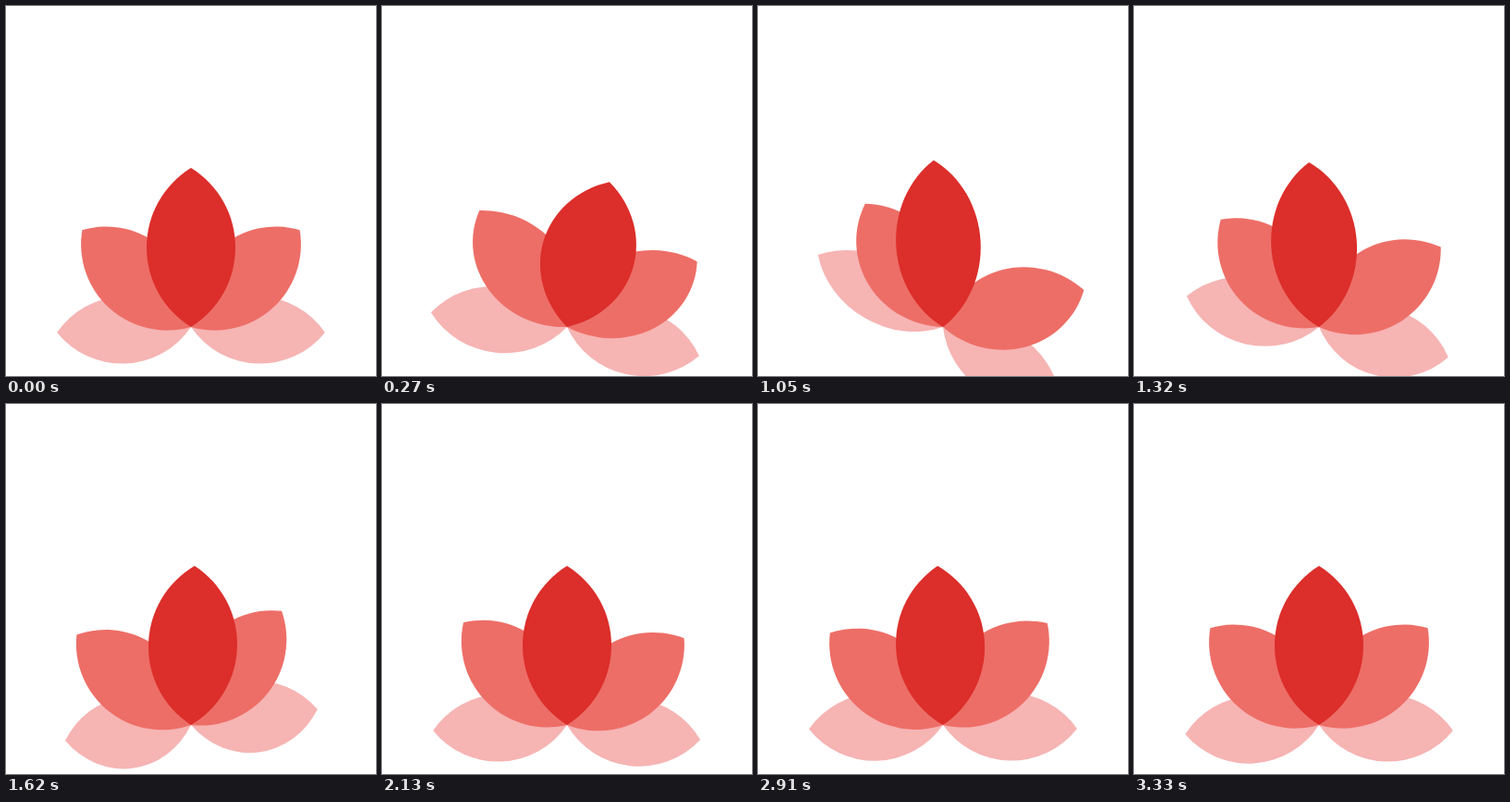
An HTML page for the animation above (3660 ms loop, 400 px wide and 400 px high).

```html
<!DOCTYPE html>
<html lang="en">
<head>
<meta charset="utf-8">
<title>Lotus</title>
<style>
html, body { margin: 0; width: 100%; height: 100%; overflow: hidden; background: #fff; }
svg { display: block; width: 100vw; height: 100vh; }
</style>
</head>
<body>
<svg id="stage" viewBox="0 0 400 400"></svg>
<script>
const LOOP = 3660, STEP = 30, LAST = 3330;
const POSES = [0, 540, 1050, 1620, 2130, 2580, LAST];

const kinds = {
  low: { length: 145, width: 73, rest: 92.4, fill: '#f6b4b3' },
  mid: { length: 157.5, width: 87, rest: 48.3, fill: '#ed6e67' },
  top: { length: 172, width: 96, rest: 0, fill: '#dc2e2a' }
};

// Painted back to front. The lists hold the poses after the rest pose:
// swing and bend in degrees, stretch as a factor along the petal.
const petals = [
  { kind: 'low', side: -1, swing: [21.2, 32.4, -4.7, 0, 2.4, -1.6], stretch: [1.05, 1.076, .945] },
  { kind: 'low', side: 1, swing: [23.7, 29.5, -9.5, 3.9, -.8], stretch: [1.02, 1.03, .95] },
  { kind: 'mid', side: -1, swing: [24.8, 16, -3.4, 3, -3.9], bend: [9, 2] },
  { kind: 'mid', side: 1, swing: [33.4, 27, -9.8, 5.2, -3.6], bend: [-9, -2] },
  { kind: 'top', side: 1, swing: [32.2, -3.2, 1.3, 0, -3.3], stretch: [.907, 1.05] }
];

const stage = document.getElementById('stage');

for (const p of petals) {
  const { length, width, rest, fill } = kinds[p.kind];
  const r = (length * length + width * width) / (4 * width);
  const arc = `A${r} ${r} 0 0 1 0 `;
  p.rest = p.side * rest;
  p.node = document.createElementNS('http://www.w3.org/2000/svg', 'path');
  p.node.setAttribute('d', `M0 0${arc}${-length}${arc}0Z`);
  p.node.setAttribute('fill', fill);
  stage.append(p.node);
}

// Smooth spline through the poses; missing poses are at rest.
function track(list, rest, t) {
  const end = POSES.length - 1;
  const value = i => list[i - 1] ?? rest;
  const slope = i => i <= 0 || i >= end ? 0
    : (value(i + 1) - value(i - 1)) / (POSES[i + 1] - POSES[i - 1]);
  const next = POSES.findIndex(time => time > t);
  const i = next < 0 ? end - 1 : next - 1;
  const span = POSES[i + 1] - POSES[i];
  const u = (t - POSES[i]) / span, v = 1 - u;
  return value(i) * (1 + 2 * u) * v * v
    + value(i + 1) * (3 - 2 * u) * u * u
    + span * u * v * (slope(i) * v - slope(i + 1) * u);
}

function draw(ms) {
  const t = Math.min(LAST, Math.floor((ms % LOOP) / STEP) * STEP);
  for (const { node, rest, swing, stretch = [], bend = [] } of petals) {
    const angle = rest + track(swing, 0, t);
    const s = track(stretch, 1, t);
    const skew = track(bend, 0, t);
    node.setAttribute('transform',
      `translate(200 347) rotate(${angle}) skewY(${skew}) scale(${1 / s} ${s})`);
  }
}

const start = performance.now();
function tick() {
  draw(performance.now() - start);
  requestAnimationFrame(tick);
}
tick();
</script>
</body>
</html>
```
